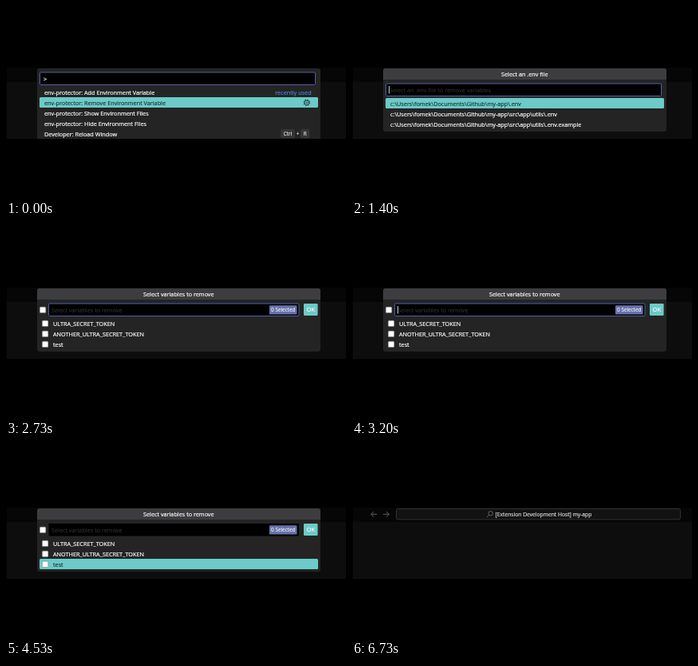
Recreate the animation shown at these times as an HTML page. Size 426 by 240 pixels, loop 6.87 s.

```html
<!DOCTYPE html>
<html lang="en">
<head>
<meta charset="utf-8">
<title>Remove environment variable</title>
<style>
html, body { margin: 0; height: 100%; overflow: hidden; background: #000; }
svg { display: block; width: 100vw; height: 100vh; }
text { font: 7.28px "Open Sans", "Noto Sans", sans-serif; fill: #fff; stroke: #fff; stroke-width: .2; }
.mid { text-anchor: middle; }
.panel { fill: #242424; }
.head { fill: #3d3d40; }
.field { fill: #000; }
.focus { fill: none; stroke: #5c68b0; stroke-width: .9; }
.hint { fill: #38383b; stroke: none; }
.row, .ok { fill: #6ccac8; }
.on { fill: #102826; stroke: #102826; stroke-width: .1; }
.box { fill: #fff; stroke: #777; stroke-width: .5; }
.badge { fill: #6872aa; }
.small { font-size: 6.4px; stroke-width: .1; }
.link { fill: #4a90f0; stroke: #4a90f0; stroke-width: .1; }
.title { font-size: 6.73px; fill: #d8d8d8; stroke: #d8d8d8; }
.key { fill: #353538; stroke: #444448; stroke-width: .4; }
.line { fill: none; stroke: #777; stroke-width: .8; }
.caret { fill: #ddd; }

/* every state is a hard cut on one 6.87 s clock */
.t { opacity: 0; animation: 6.87s step-end infinite; }
#commands { animation-name: commands; }
#files { animation-name: files; }
#vars { animation-name: vars; }
#closed { animation-name: closed; }
#caretA { animation-name: caretA; }
#caretB { animation-name: caretB; }
#typing { animation-name: typing; }
#rowA { animation-name: rowA; }
#rowB { animation-name: rowB; }
#rowC { animation-name: rowC; }
#none { animation-name: none-picked; }
#one, #tick { animation-name: picked; }
@keyframes commands { 0% { opacity: 1 } 5.82%, 100% { opacity: 0 } }
@keyframes files { 0%, 26.64%, 100% { opacity: 0 } 5.82% { opacity: 1 } }
@keyframes vars { 0%, 92.1%, 100% { opacity: 0 } 26.64% { opacity: 1 } }
@keyframes closed { 0% { opacity: 0 } 92.1%, 100% { opacity: 1 } }
@keyframes caretA { 0%, 13.1%, 26.64%, 100% { opacity: 0 } 5.82%, 20.38% { opacity: 1 } }
@keyframes caretB { 0%, 33.92%, 48.47%, 100% { opacity: 0 } 26.64%, 41.19% { opacity: 1 } }
@keyframes typing { 0% { opacity: 1 } 53.4%, 100% { opacity: 0 } }
@keyframes rowA { 0%, 57.2%, 100% { opacity: 0 } 53.4% { opacity: 1 } }
@keyframes rowB { 0%, 64%, 100% { opacity: 0 } 57.2% { opacity: 1 } }
@keyframes rowC { 0% { opacity: 0 } 64%, 100% { opacity: 1 } }
@keyframes none-picked { 0% { opacity: 1 } 76.7%, 100% { opacity: 0 } }
@keyframes picked { 0% { opacity: 0 } 76.7%, 100% { opacity: 1 } }
</style>
</head>
<body>
<svg viewBox="0 0 426 240">
  <defs>
    <rect id="bar" class="row" x="42" width="349" height="13" rx="1.5"/>
    <rect id="check" class="box" width="7.4" height="7.4" rx="1.2"/>
    <g id="dialog">
      <rect class="panel" x="39" y="78" width="355" height="79" rx="3"/>
      <path class="head" d="M39 92V81a3 3 0 0 1 3-3H391a3 3 0 0 1 3 3V92Z"/>
    </g>
  </defs>

  <rect width="426" height="240"/>
  <rect x="1" y="77" width="425" height="18" fill="#060606"/>
  <rect x="1" y="95" width="425" height="71" fill="#0d0d0d"/>

  <g id="commands" class="t">
    <path class="panel" d="M39 166V81a3 3 0 0 1 3-3H391a3 3 0 0 1 3 3V166Z"/>
    <rect class="field" x="42.5" y="83" width="345" height="15.5"/>
    <rect class="focus" x="42.5" y="83" width="345" height="15.5" rx="1"/>
    <text x="47" y="93.6">&gt;</text>
    <use href="#bar" y="114"/>
    <text x="48" y="110.5">env-protector: Add Environment Variable</text>
    <text x="48" y="123.5" class="on">env-protector: Remove Environment Variable</text>
    <text x="48" y="136.5">env-protector: Show Environment Files</text>
    <text x="48" y="149.5">env-protector: Hide Environment Files</text>
    <text x="48" y="162.5">Developer: Reload Window</text>
    <text x="337.3" y="110.5" class="link">recently used</text>
    <g fill="none" stroke="#1c3c3c">
      <circle cx="376.8" cy="120.8" r="3.5" stroke-width="1.3" stroke-dasharray="1.5 1.25"/>
      <circle cx="376.8" cy="120.8" r="2.8" stroke-width=".8"/>
      <circle cx="376.8" cy="120.8" r="1" stroke-width=".7"/>
    </g>
    <rect class="key" x="344.5" y="154.3" width="17" height="10.4" rx="1.5"/>
    <rect class="key" x="369.5" y="154.3" width="10.5" height="10.4" rx="1.5"/>
    <text class="mid small" x="353" y="161.8">Ctrl</text>
    <text class="mid small" x="365.7" y="161.8">+</text>
    <text class="mid small" x="374.8" y="161.8">R</text>
  </g>

  <g id="files" class="t">
    <use href="#dialog"/>
    <text class="mid" x="216.3" y="87.8">Select an .env file</text>
    <rect class="field" x="42.5" y="97" width="345" height="15.5"/>
    <rect class="focus" x="42.5" y="97" width="345" height="15.5" rx="1"/>
    <text x="47" y="107.6" class="hint">Select an .env file to remove variables</text>
    <rect id="caretA" class="t caret" x="46" y="100" width=".9" height="9.6"/>
    <use href="#bar" y="115"/>
    <text x="48" y="124.5" class="on">c:\Users\fomek\Documents\Github\my-app\.env</text>
    <text x="48" y="137.5">c:\Users\fomek\Documents\Github\my-app\src\app\utils\.env</text>
    <text x="48" y="150.5">c:\Users\fomek\Documents\Github\my-app\src\app\utils\.env.example</text>
  </g>

  <g id="vars" class="t">
    <use href="#dialog"/>
    <text class="mid" x="216.3" y="87.8">Select variables to remove</text>
    <rect class="field" x="53.5" y="97" width="313.5" height="15.5"/>
    <rect id="typing" class="t focus" x="53.5" y="97" width="313.5" height="15.5" rx="1"/>
    <text x="57" y="107.6" class="hint">Select variables to remove</text>
    <rect id="caretB" class="t caret" x="57" y="100" width=".9" height="9.6"/>
    <rect class="badge" x="330" y="99.2" width="34.5" height="11.4" rx="1.2"/>
    <text id="none" class="t mid small" x="347.3" y="107.2">0 Selected</text>
    <text id="one" class="t mid small" x="347.3" y="107.2">1 Selected</text>
    <rect class="ok" x="373" y="97" width="17.6" height="15" rx="1.2"/>
    <text class="mid" x="381.8" y="107.2">OK</text>
    <text x="59" y="124.5">ULTRA_SECRET_TOKEN</text>
    <text x="59" y="137.5">ANOTHER_ULTRA_SECRET_TOKEN</text>
    <text x="59" y="150.5">test</text>
    <g id="rowA" class="t">
      <use href="#bar" y="115"/>
      <text x="59" y="124.5" class="on">ULTRA_SECRET_TOKEN</text>
    </g>
    <g id="rowB" class="t">
      <use href="#bar" y="128"/>
      <text x="59" y="137.5" class="on">ANOTHER_ULTRA_SECRET_TOKEN</text>
    </g>
    <g id="rowC" class="t">
      <use href="#bar" y="141"/>
      <text x="59" y="150.5" class="on">test</text>
    </g>
    <use href="#check" x="42.4" y="101.2"/>
    <use href="#check" x="45.4" y="118.2"/>
    <use href="#check" x="45.4" y="131.2"/>
    <use href="#check" x="45.4" y="144.2"/>
    <g id="tick" class="t">
      <rect x="45.2" y="144" width="7.8" height="7.8" rx="1.2" fill="#1a73d8"/>
      <path d="M46.8 148l1.6 1.7 3-3.6" fill="none" stroke="#fff" stroke-width="1.1"/>
    </g>
  </g>

  <g id="closed" class="t">
    <path class="line" d="M31.3 85.3H24M27.2 82l-3.3 3.3 3.3 3.3M39 85.3h7.3M43.1 82l3.3 3.3-3.3 3.3"/>
    <rect x="55.5" y="78.5" width="356" height="13.4" rx="2.5" fill="#121214" stroke="#38382e" stroke-width=".9"/>
    <circle class="line" cx="173.6" cy="84.2" r="2.7"/>
    <path class="line" d="M171.6 86.2l-2.8 3"/>
    <text x="179.6" y="88" class="title">[Extension Development Host] my-app</text>
  </g>
</svg>
</body>
</html>
```
